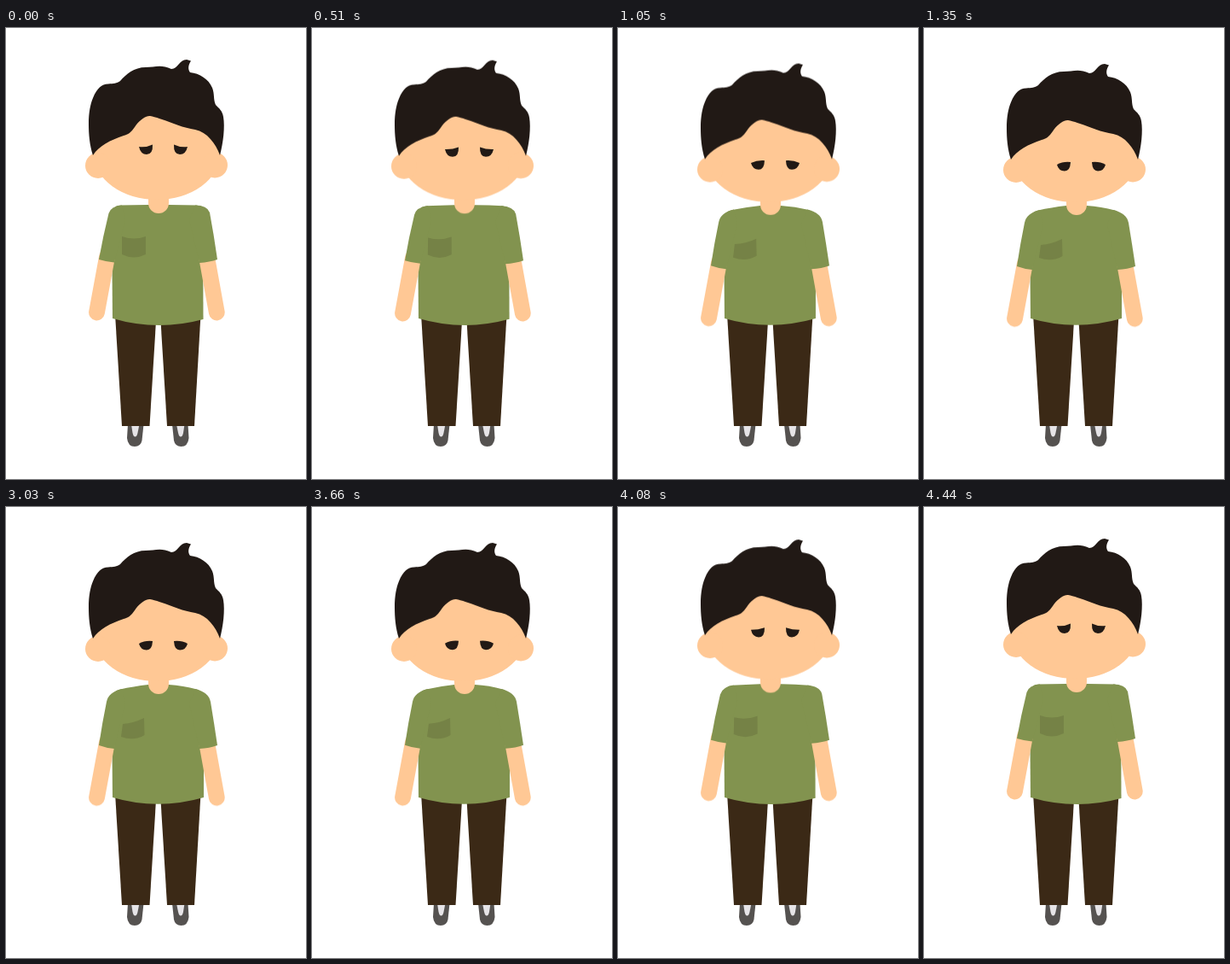
Recreate the animation shown at these times as an HTML page. Size 352 px wide and 528 px high, loop 4500 ms.

```html
<!DOCTYPE html>
<html lang="en">
<head>
<meta charset="utf-8">
<title>Sigh</title>
<style>
html, body { margin: 0; width: 100%; height: 100%; overflow: hidden; background: #fff; }
svg { display: block; width: 100vw; height: 100vh; }
.skin { fill: #ffc895; }
.hair { fill: #211915; }
.shirt { fill: #82934f; }
.pocket { fill: #758246; }
.pants { fill: #3b2916; }
.shoe { fill: #555250; }
.sock { fill: #e6e4e7; }
.arm { fill: none; stroke: #ffc895; stroke-width: 18.8; stroke-linecap: round; }
</style>
</head>
<body>
<svg viewBox="0 0 352 528">
  <g id="foot">
    <path class="shoe" d="M143 464 L142 480 Q143 490 151 490 Q158 490 159.5 483 L161.5 464 Z"/>
    <path class="sock" d="M147 464 L148.5 474 Q149.5 478.5 151.5 478.5 Q153.5 478.5 154.5 474 L156.5 464 Z"/>
  </g>
  <use href="#foot" transform="translate(356.5 0) scale(-1 1)"/>
  <path class="pants" d="M128 335 L176.5 335 L168.5 466 L136 466 Z"/>
  <path class="pants" d="M181 335 L228.5 335 L221 466 L189 466 Z"/>
  <path class="shirt" id="torso"/>
  <path class="pocket" id="pocket"/>
  <g id="arms">
    <path class="arm" d="M118.5 268 L106.5 333"/>
    <path class="arm" d="M235.5 268 L247.3 333"/>
  </g>
  <path class="shirt" id="sleeveL"/>
  <path class="shirt" id="sleeveR"/>
  <path class="skin" id="neck" d="M167 190 L167 205 A12 12 0 0 0 191 205 L191 190 Z"/>
  <ellipse class="skin" id="face" cx="177" cy="147" rx="74" ry="54"/>
  <g id="head">
    <circle class="skin" cx="108" cy="161" r="15"/>
    <circle class="skin" cx="245" cy="160.5" r="15"/>
    <path class="hair" d="M102 149 C98 137 97 124 97 112 C97 99 99 89 102 82
      C107 70 112 66 120 65.5 C126 65 130 65 134 62 C141 54 150 46 164 46
      C174 46 182 42 194 48 C202 48 203 37 212 37 L217 38.5
      C214 43 213 48 216 52 C227 53 238 60 242 70 C245 78 243 83 246 90
      C250 94 254 97 255 104 C257 116 255 134 251 149
      C246 135 236 122 222 119 C208 117 195 111 183 107 C174 104 171 103 168 103
      C161 104 155 110 151 116 C147 122 143 125 138 126 C123 131 109 138 102 149 Z"/>
  </g>
  <path class="hair" id="eyeL"/>
  <path class="hair" id="eyeR"/>
</svg>
<script>
const LOOP = 4500;
const EASE = "cubic-bezier(.33, 0, .4, 1)";

// time in ms, pose (0 upright, 1 slumped), easing to the next step
const STEPS = [
  [0, 0, "linear"],
  [300, 0, EASE],
  [1350, 1, "linear"],
  [3600, 1, EASE],
  [4440, 0, "linear"],
  [LOOP, 0, "linear"]
];

// each shape: upright outline, slumped outline
const SHAPES = {
  torso: [
    "M167 207 Q150 207 134 207.5 Q125 208 124 218 L125 340 Q178 355.5 231.5 341 L231 218 Q230 209 224 207.5 Q208 207 191 207 Z",
    "M167 208 Q149 210 134 213.5 Q125 215 124 224 L125 340 Q178 355.5 232 340 L232 224 Q232 217 224 213.5 Q208 209 191 208 Z"
  ],
  sleeveL: [
    "M136 207.5 Q123 208.5 120.5 217 Q114 243 109 271 Q117 273.5 127 274.5 L140 225 Z",
    "M136 213 Q120 217 118 228 Q113 252 109 279 Q117 282 127 283 L140 230 Z"
  ],
  sleeveR: [
    "M222 207.5 Q236 207.5 239 216 Q244 243 248 271 Q239 274 227 275 L215 225 Z",
    "M222 213 Q238 217 240 228 Q244 252 248 279 Q239 282.5 227 283 L215 230 Z"
  ],
  pocket: [
    "M136 244 Q150 249 164 244 L164 265 Q150 272 136 265 Z",
    "M137 254 Q150 253 162 247 L162.5 267 Q150 274.5 135 269 Z"
  ],
  eyeL: [
    "M156 139 Q165 140 172 136.5 Q172.5 148 165 148 Q158 148 156 139 Z",
    "M156 160 Q163 156 172 157 Q171.5 167.5 165 167.5 Q158 167.5 156 160 Z"
  ],
  eyeR: [
    "M213 139 Q204 140 197 136.5 Q196.5 148 204 148 Q211 148 213 139 Z",
    "M213 160 Q206 156 197 157 Q197.5 167.5 204 167.5 Q211 167.5 213 160 Z"
  ]
};

// downward shift when slumped
const DROPS = { head: 5, face: 3, neck: 2, arms: 7.3 };

function play(id, prop, poses) {
  const frames = STEPS.map(([time, pose, easing]) =>
    ({ offset: time / LOOP, [prop]: poses[pose], easing }));
  document.getElementById(id).animate(frames, { duration: LOOP, iterations: Infinity });
}

for (const [id, outlines] of Object.entries(SHAPES)) {
  document.getElementById(id).setAttribute("d", outlines[0]);
  play(id, "d", outlines.map(d => `path("${d}")`));
}
for (const [id, dy] of Object.entries(DROPS)) {
  play(id, "transform", ["translateY(0px)", `translateY(${dy}px)`]);
}
</script>
</body>
</html>
```
